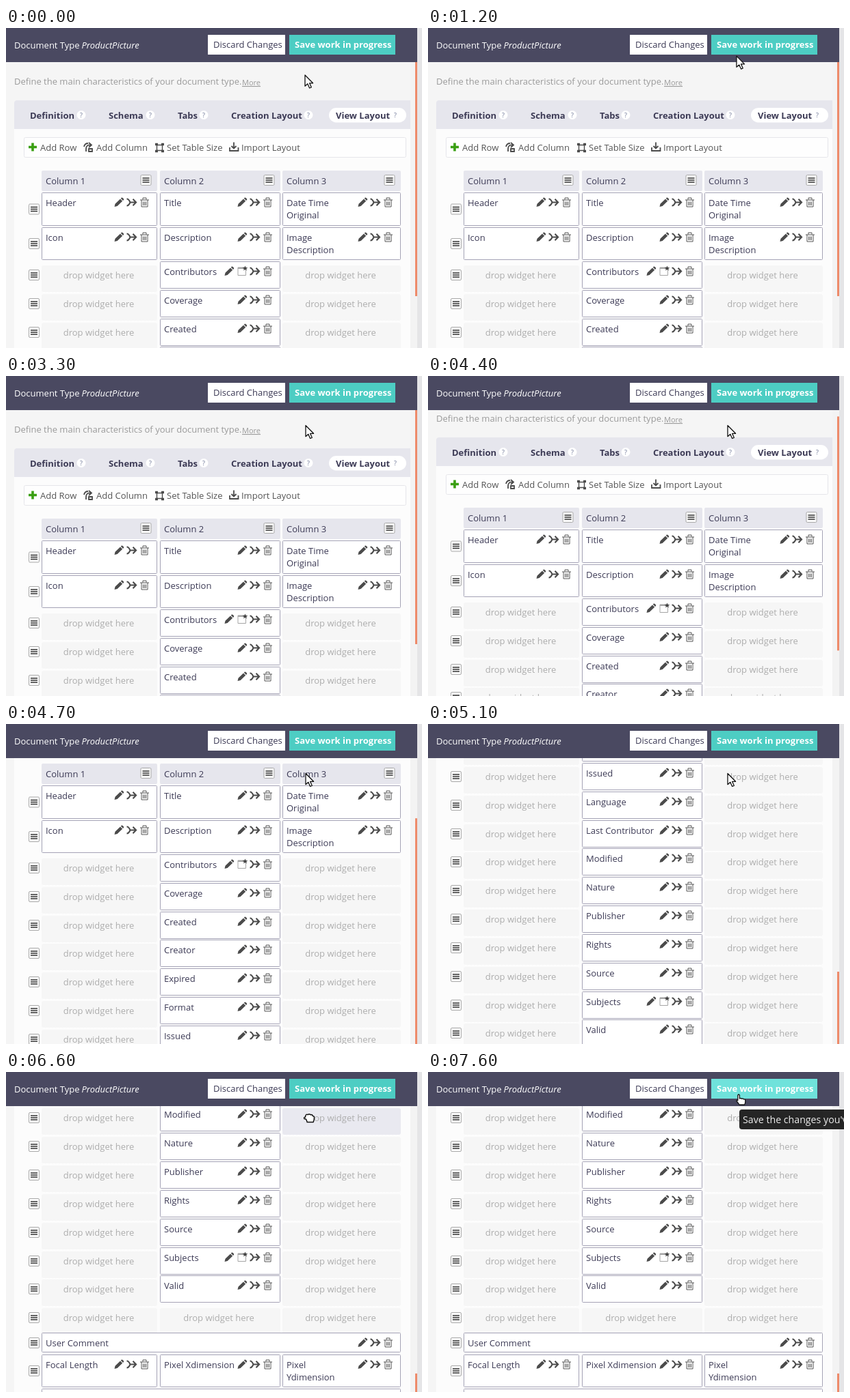
Animation of 608 by 469 pixels, one loop 8 s. Source, as an HTML page:

```html
<!DOCTYPE html>
<html lang="en">
<head>
<meta charset="utf-8">
<title>Document type editor</title>
<style>
  html, body { margin: 0; width: 100%; height: 100%; overflow: hidden; background: #f5f5f5; }
  svg { display: block; width: 100%; height: 100%; }
  text { font: 13px "Open Sans", "Noto Sans", sans-serif; fill: #3c3a55; }
  .bold { font-weight: 700; }
  .soft { fill: #9a9a9a; }
  .drop { fill: #adadad; text-anchor: middle; }
  .tool { fill: #555; }
  .more { font-size: 11px; text-decoration: underline; }
  .help { font-size: 9px; text-anchor: middle; fill: #6a7394; }
  .tip { font-size: 14.2px; fill: #ececec; }
  .white { fill: #fff; }
</style>
</head>
<body>
<svg viewBox="0 0 608 469" preserveAspectRatio="none">
  <defs>
    <g id="pencil" fill="#4b4b4b">
      <path d="M-6.5 6.5l1-4.2L2-5l3.2 3.2L-2.3 5.5zM2.8-5.8l.9-.9q.9-.7 1.8.1l1.4 1.4q.7.9 0 1.7l-.9.9z"/>
    </g>
    <path id="merge" fill="none" stroke="#4b4b4b" stroke-width="2.1"
      d="M-7-5Q-4-5-2 0H6M-7 5Q-4 5-2 0M2-4.8L6.6 0L2 4.8"/>
    <path id="trash" fill="none" stroke="#555"
      d="M-6.5-3.5H6.5M-2.5-4V-6.5H2.5V-4M-4.5-3.5V6.5H4.5V-3.5M-2-1V4.5M0-1V4.5M2-1V4.5"/>
    <g id="window">
      <path d="M-6-5.5H5.5V6H-6z" fill="#fff" stroke="#a5a5a5"/>
      <path d="M-6-4.5H3" stroke="#a5a5a5" stroke-width="2"/>
      <path d="M4.5-8l1.1 2.5 2.7.2-2.1 1.7.7 2.6-2.4-1.4-2.4 1.4.7-2.6L.7-5.3l2.7-.2z" fill="#444"/>
    </g>
    <g id="menu">
      <rect x="-7.5" y="-7.5" width="15" height="15" rx="1.5" fill="#fafafa" stroke="#a9a9a9"/>
      <path d="M-5-3H5M-5 0H5M-5 3H5" stroke="#333" stroke-width="1.7"/>
    </g>
    <path id="arrow" fill="#fff" stroke="#111" stroke-width="1.3" stroke-linejoin="round"
      d="M0 0V16.2L3.8 12.8L6.6 19L9.3 17.8L6.6 11.8H11.6z"/>
    <path id="hand" fill="#fff" stroke="#111" stroke-width="1.3" stroke-linejoin="round"
      d="M-1.2 1Q0-1 1.4 1V6Q3.5 4.6 4.3 6.4Q6.4 5.2 7.2 7Q9.6 6.2 9.8 8.6V11Q9.6 13 8.6 15H1Q-.6 12.4-3 9.8Q-3.6 7.6-1.2 8.8z"/>
    <path id="grab" fill="#fff" stroke="#111" stroke-width="1.5" stroke-linejoin="round"
      d="M-4-3Q-3-6-.5-4.8Q1.5-6.6 3.4-4.6Q6-5.4 6.6-3Q9-3 8.8-.5Q9 2 7.5 6.2H-1.5Q-3-.2-5.5 1.4Q-7.2-1.2-4-1.5z"/>
  </defs>
  <rect width="608" height="469" fill="#f5f5f5"/>
  <g id="page"></g>
  <rect x="591" y="50" width="10" height="419" fill="#f3f3f3"/>
  <rect id="thumb" x="598" width="3" height="343" fill="#ee8a6a"/>
  <rect x="601" width="7" height="469" fill="#e5e5e7"/>
  <rect width="601" height="50" fill="#4a4961"/>
  <text class="white" x="12" y="30">Document Type</text>
  <text class="white" x="110.500" y="30" font-style="italic" style="font-style:italic">ProductPicture</text>
  <rect x="295" y="10" width="113" height="29" fill="#fff"/>
  <text x="303" y="29">Discard Changes</text>
  <rect id="save" x="414" y="10" width="155" height="29"/>
  <text class="bold white" x="422" y="29">Save work in progress</text>
  <g id="tooltip">
    <rect width="170" height="29" rx="4" fill="#1b1b1b" fill-opacity=".95"/>
    <text class="tip" x="5" y="20">Save the changes you've made</text>
  </g>
  <use id="cursor"/>
</svg>
<script>
const $ = id => document.getElementById(id);
const LOOP = 8000, STEP = 100, PITCH = 41.83, FIRST = 342;
const COLS = [[52, 221], [225, 401], [404, 577]];
const DROP_X = [135.5, 311, 489];

const text = (x, y, s, cls = "") => `<text x="${x}" y="${y}" class="${cls}">${s}</text>`;
const icon = (name, x, y) => `<use href="#${name}" x="${x}" y="${y}"/>`;
const rect = (x, y, w, h, fill, extra = "") =>
  `<rect x="${x}" y="${y}" width="${w}" height="${h}" fill="${fill}" ${extra}/>`;

// A widget box with its label lines and action icons
function widget(x, right, y, h, label, windowed) {
  const top = Math.round(y);
  let out = rect(x + .5, top + .5, right - x - 1, h - 1, "#fff", 'stroke="#a5a3b6" rx="1"');
  label.split("|").forEach((line, i) => out += text(x + 6, top + 20 + i * 18, line));
  if (!label) return out;
  if (windowed) out += icon("window", right - 56, top + 14.5);
  return out + icon("pencil", right - (windowed ? 75 : 56), top + 14.5) +
    icon("merge", right - 37.5, top + 14.5) + icon("trash", right - 18.5, top + 14.5);
}

function drop(col, y, id = "") {
  const [x, right] = COLS[col], top = Math.round(y);
  return rect(x, top + 6, right - x, 39, "#f6f6f6", `rx="3" ${id && `id="${id}"`}`) +
    `<path d="M${x + 2} ${top + 45.5}H${right - 2}" stroke="#fff" stroke-dasharray="3 2"/>` +
    text(DROP_X[col], top + 25, "drop widget here", "drop");
}

const rowOf = (y, h, labels) => icon("menu", 41, y + h / 2) +
  labels.map((s, i) => widget(...COLS[i], y, h, s)).join("");

function buildPage() {
  let out = text(12, 83, "Define the main characteristics of your document type.", "soft") +
    text(345, 84, "More", "soft more") +
    rect(12, 106, 579, 1400, "#fcfcfc", 'rx="4"') +
    `<path d="M12 148V110Q12 106 16 106H591V148z" fill="#e6e6ed"/>` +
    rect(472, 117, 113, 21.5, "#fff", 'rx="10.7"');

  const tabs = [["Definition", 35, 110], ["Schema", 150, 211], ["Tabs", 251, 289],
    ["Creation Layout", 329, 442], ["View Layout", 482, 569]];
  for (const [name, x, q] of tabs) {
    out += text(x, 133, name, "bold") +
      `<circle cx="${q}" cy="127.500" r="6.5" fill="#fff"/>` + text(q, 131, "?", "help");
  }

  out += rect(26.5, 160.5, 558, 29, "#fefefe", 'stroke="#e6e6ea" rx="2"') +
    `<path d="M39 168.500V180.500M33 174.500H45" stroke="#3a9f12" stroke-width="3.6"/>
     <g fill="none" stroke="#4b4b4b" stroke-width="1.8">
       <path d="M117 181V177Q117 171 124 171.500M121 168L125 171.500L121 175M114 174Q115 169 120 169M121 177H126V181H121z"/>
       <path d="M220.500 171.500H228.500V179.500H220.500z" stroke-width="1.4"/>
       <path d="M218 170.500H222M218 180.500H222M227 170.500H231M227 180.500H231" stroke-width="3.4"/>
       <path d="M327 175V180H339.500V175M333 167.500V176M329.500 173L333 176.500L336.500 173"/>
     </g>`;
  [["Add Row", 50], ["Add Column", 132], ["Set Table Size", 235], ["Import Layout", 344]]
    .forEach(([s, x]) => out += text(x, 180, s, "tool"));

  COLS.forEach(([x, right], i) => {
    out += rect(x, 209, right - x, 30, "#e6e6ed", 'rx="2"') +
      text(x + 6, 229, "Column " + (i + 1)) + icon("menu", right - 16.5, 223);
  });
  out += rowOf(241, 49, ["Header", "Title", "Date Time|Original"]) +
    rowOf(292, 48, ["Icon", "Description", "Image|Description"]);

  const fields = ["Contributors", "Coverage", "Created", "Creator", "Expired", "Format",
    "Issued", "Language", "Last Contributor", "Modified", "Nature", "Publisher",
    "Rights", "Source", "Subjects", "Valid", ""];
  fields.forEach((name, i) => {
    const y = FIRST + i * PITCH;
    out += icon("menu", 41, Math.round(y + 20)) + drop(0, y) +
      drop(2, y, name === "Modified" ? "hover" : "") +
      (name ? widget(...COLS[1], y, 40, name, /Contributors|Subjects/.test(name)) : drop(1, y));
  });

  return out + icon("menu", 41, 1068) + widget(52, 577, 1053, 29, "User Comment") +
    rowOf(1085, 48, ["Focal Length", "Pixel Xdimension", "Pixel|Ydimension"]) +
    widget(52, 577, 1135, 48, "");
}

// Scroll offset at each step from 4400 ms on
const SCROLL = [16, 53, 100, 151, 240, 340, 441, 536, 612, 655, 671];
const PATH = [[0, 437, 69], [800, 437, 69], [1500, 460, 23], [2800, 460, 23],
  [3300, 438, 72.5], [6500, 438, 72.5], [7000, 454, 33], [LOOP, 454, 33]];

function pointer(t) {
  const i = PATH.findIndex(p => p[0] > t);
  const [t0, x0, y0] = PATH[i - 1], [t1, x1, y1] = PATH[i];
  const u = (t - t0) / (t1 - t0), e = u * u * (3 - 2 * u);
  return [x0 + (x1 - x0) * e, y0 + (y1 - y0) * e];
}

const move = (el, x, y) => el.setAttribute("transform", `translate(${x} ${y})`);

function draw(ms) {
  const t = Math.floor((ms % LOOP) / STEP) * STEP;
  const n = (t - 4400) / STEP;
  const scroll = n < 0 ? 0 : SCROLL[Math.min(n, SCROLL.length - 1)];
  move($("page"), 0, -scroll);
  $("thumb").setAttribute("y", 50 + scroll * .584);

  const [x, y] = pointer(t);
  const onSave = y < 39, onCell = t >= 5400 && y > 50;
  $("save").setAttribute("fill", onSave ? "#6fe2db" : "#4dcdc3");
  $("hover").setAttribute("fill", onCell ? "#e9e9f0" : "#f6f6f6");
  $("cursor").setAttribute("href", onSave ? "#hand" : onCell ? "#grab" : "#arrow");
  move($("cursor"), x + (onCell ? 2 : 0), y - (onCell ? 1 : 0));

  const shown = t >= 7500 ? t - 7500 : t >= 2000 && t < 2900 ? t - 2000 : -1;
  $("tooltip").setAttribute("opacity", shown < 0 ? 0 : shown < STEP ? .5 : 1);
  move($("tooltip"), x + 1, y + 22);
}

$("page").innerHTML = buildPage();
const start = performance.now();
function tick() {
  draw(performance.now() - start);
  requestAnimationFrame(tick);
}
tick();
</script>
</body>
</html>
```
